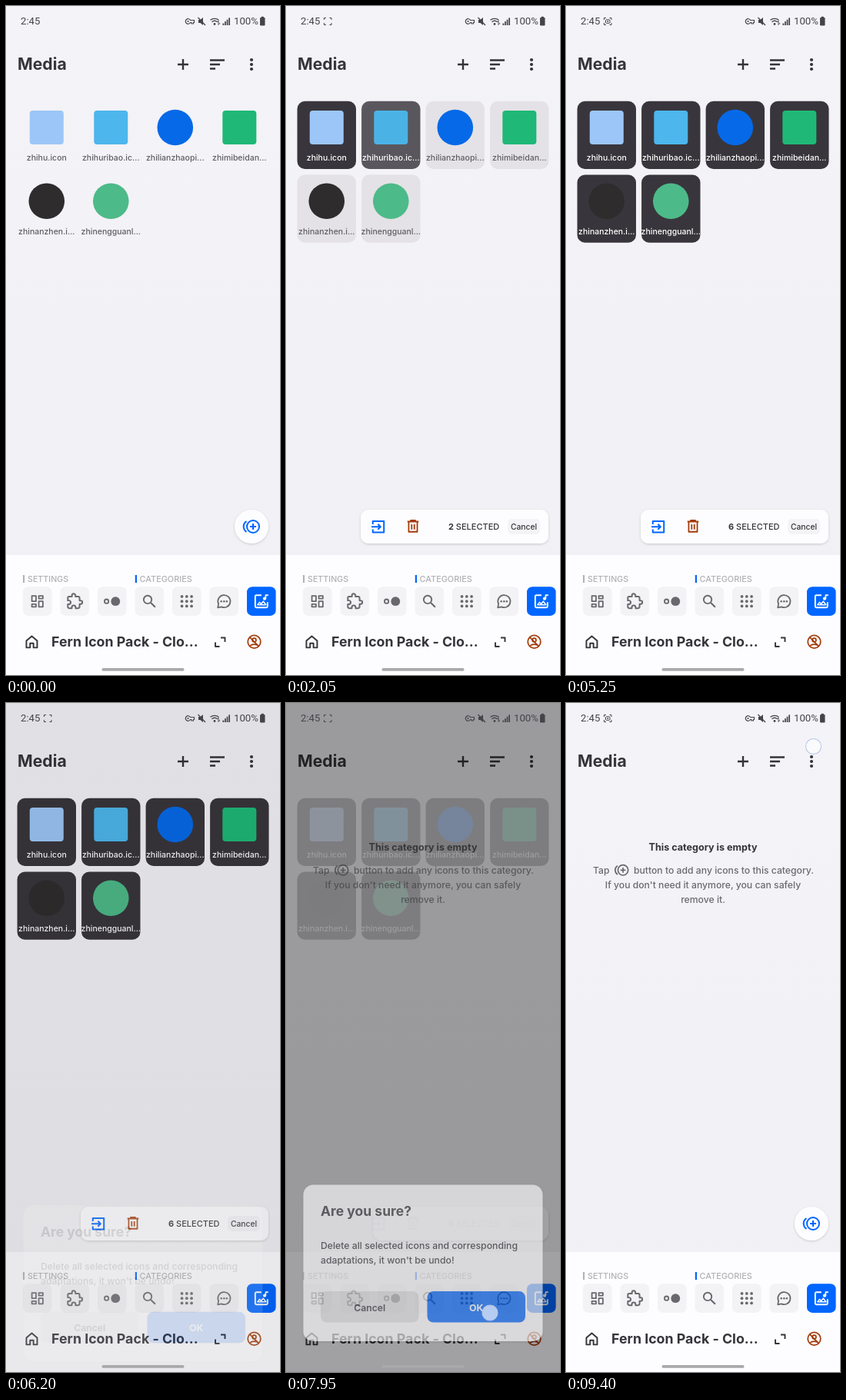
Write an HTML page that moves like this. It is 356 px wide and 870 px high and loops after 9450 ms.

```html
<!DOCTYPE html>
<html lang="en">
<head>
<meta charset="utf-8">
<title>Media category</title>
<style>
html, body { margin: 0; width: 100%; height: 100%; overflow: hidden; background: #f2f1f5; }
svg { display: block; width: 100vw; height: 100vh; }
text { font-family: Inter, "Noto Sans", sans-serif; font-weight: 500; white-space: pre; }
.head { font-weight: 700; fill: #353439; }
.status text { font-family: Roboto, "Noto Sans", sans-serif; font-weight: 400; }
.line { fill: none; stroke: currentColor; stroke-linejoin: round; }
</style>
</head>
<body>
<svg id="stage" viewBox="0 0 356 870"></svg>
<script>
const LOOP = 9450;
const INK = '#353439', GREY = '#69686c', BLUE = '#0066ff', RUST = '#a33a08';
const TILE = { w: 76.4, h: 88.2, r: 10 };

// Each tile: label, shape, colour and the moment it becomes selected.
const tiles = [
  ['zhihu.icon', 'square', '#9cc6f7', 700],
  ['zhihuribao.ic...', 'square', '#4db6ec', 1870],
  ['zhilianzhaopi...', 'circle', '#0669e8', 2570],
  ['zhimibeidan...', 'square', '#1fb877', 3120],
  ['zhinanzhen.i...', 'circle', '#2f2c2e', 3570],
  ['zhinengguanl...', 'circle', '#4dba89', 4070]
].map(([label, shape, color, pick], i) =>
  ({ label, shape, color, pick, x: 14.6 + 83.5 * (i % 4), y: i < 4 ? 123.7 : 219.5 }));

// Each touch: x, y, start, release.
const touches = [
  [63, 186, 250, 1000], [146, 178, 1750, 1870], [229, 178, 2450, 2570], [311, 177, 3000, 3120],
  [62, 274, 3450, 3570], [146, 270, 3950, 4070], [165, 677, 5950, 6070],
  [265, 793, 7700, 7970], [321.5, 56.5, 9400, 9900]
];

const clamp = v => Math.max(0, Math.min(1, v));
const span = (t, from, to) => clamp((t - from) / (to - from));
const easeOut = p => 1 - (1 - p) ** 2;
const easeInOut = p => p < .5 ? 4 * p ** 3 : 1 - (2 - 2 * p) ** 3 / 2;
const lerp = (a, b, p) => a + (b - a) * p;
const mix = (a, b, p) => `rgb(${a.map((v, i) => Math.round(lerp(v, b[i], p)))})`;

const rect = (x, y, w, h, r, fill, more = '') =>
  `<rect x="${x}" y="${y}" width="${w}" height="${h}" rx="${r}" fill="${fill}" ${more}/>`;
const disc = (x, y, r, more = '') => `<circle cx="${x}" cy="${y}" r="${r}" ${more}/>`;
const ring = (x, y, r, w = 2) => disc(x, y, r, `class="line" stroke-width="${w}"`);
const line = (d, w = 2) => `<path class="line" d="${d}" stroke-width="${w}"/>`;
const text = (x, y, size, str, more = '') =>
  `<text x="${x}" y="${y}" font-size="${size}" ${more}>${str}</text>`;
const mid = 'text-anchor="middle"';
// Places a drawing made on a 24 unit grid, centred on x, y.
const icon = (x, y, size, color, body) =>
  `<g color="${color}" fill="${color}" transform="translate(${x - size / 2} ${y - size / 2}) scale(${size / 24})">${body}</g>`;

const art = {
  addMany: ring(14.5, 12, 8) + line('M6 5.2A8 8 0 0 0 6 18.8M14.5 8v8M10.5 12h8'),
  board: line('M4 4h6v8H4zM14 4h6v4h-6zM14 12h6v8h-6zM4 16h6v4H4z'),
  puzzle: line('M20.5 11H19V7c0-1.1-.9-2-2-2h-4V3.5a2.5 2.5 0 0 0-5 0V5H4c-1.1 0-2 .9-2 2v3.8h1.5a2.7 2.7 0 0 1 0 5.4H2V20c0 1.1.9 2 2 2h3.8v-1.5a2.7 2.7 0 0 1 5.4 0V22H17c1.1 0 2-.9 2-2v-4h1.5a2.5 2.5 0 0 0 0-5z', 2.2),
  pair: ring(4, 12, 3) + disc(17, 12, 6.6),
  search: ring(9.5, 9.5, 5.8, 2.1) + line('M14 14l6.5 6.5', 2.3),
  dots: [5, 12, 19].map(y => [5, 12, 19].map(x => disc(x, y, 2.1)).join('')).join(''),
  chat: line('M3 21l1-5.2A9 9 0 1 1 8.2 20z') + [8, 12, 16].map(x => disc(x, 12, 1.4)).join(''),
  image: line('M12 4H5.5A1.5 1.5 0 0 0 4 5.500v13A1.5 1.5 0 0 0 5.5 20h13a1.5 1.5 0 0 0 1.5-1.5V13', 1.9) +
    line('M7 16.500l2.700-3.300 2 2.300 2.800-3.500 3.500 4.500z', 1.5) + disc(16.2, 8.5, 2.1) + line('M17.600 8.500V4H21', 1.7),
  home: line('M4 10.8L12 4l8 6.8V21h-5.5v-6.5h-5V21H4z', 2.2),
  noUser: ring(12, 12, 9.5) + ring(12, 9.5, 2.8, 1.9) +
    line('M6 18c2.5-3 9.5-3 12 0M5.3 5.3l13.4 13.4', 1.9),
  bin: line('M3.5 5h17M8.5 4.5V3h7v1.5M5.500 5v15.500h13V5M10 9v8M14 9v8', 2.1),
  enter: line('M4 8.500V4h16.500v16.500H4V16M2 12.200h13M11.500 8.200l4 4-4 4', 2.3)
};

function statusBar() {
  return `<g class="status" id="status">
    ${text(19, 24, 13.2, '2:45')}
    <g id="finder">${line('M52 15.5h-2.500V18M56.500 15.5H59V18M49.500 22v2.500H52M59 22v2.500h-2.500', 1)}
      <g id="blink">${rect(51.5, 17.8, 5.5, 4.5, 1, 'none', 'class="line" stroke-width="1"')}${disc(54.25, 20, .9)}</g></g>
    ${line('M239.500 18.500a3.300 3.300 0 1 0 0 3h1.500v1.500h2.500v-1.500h1v-3z', 1.200)}${disc(236.5, 20, 1.1)}
    <path d="M250 18h2.5l3.5-3v10l-3.5-3H250z"/>${line('M249.5 15l9.5 10', 1.3)}
    ${line('M265.5 18.3a8.5 8.5 0 0 1 11 0M267.5 20.7a5.5 5.5 0 0 1 7 0', 1.3)}${disc(271, 23.5, 1.4)}
    ${line('M276 19v5.5M278 22l-2 2.5M274.5 21l1.5-2', .9)}
    ${[0, 1, 2, 3].map(i => rect(281.5 + i * 2.6, 22.5 - i * 2.4, 1.7, 2.5 + i * 2.4, 0, 'currentColor')).join('')}
    ${text(296, 24, 13.2, '100%')}
    ${rect(330, 15, 6.5, 10.5, 1.2, 'currentColor')}${rect(331.8, 13.8, 3, 2, .5, 'currentColor')}
  </g>`;
}

function topBar() {
  return text(15, 83, 21.2, 'Media', 'class="head"') +
    `<g color="${INK}" fill="${INK}">${line('M223 76h14M230 69v14', 2.4)}
    ${line('M265 70.5h19M265 76h13M265 81.5h7', 2.5)}
    ${[70, 76, 82].map(y => disc(319, y, 2.1)).join('')}</g>`;
}

function bottomBar() {
  const kinds = ['board', 'puzzle', 'pair', 'search', 'dots', 'chat', 'image'];
  const buttons = kinds.map((kind, i) => {
    const x = 22 + i * 48.5, on = kind === 'image';
    return rect(x, 755.3, 37.6, 37.6, 7, on ? BLUE : '#f3f2f4') +
      icon(x + 18.8, 774.2, on ? 24 : 21.5, on ? '#fff' : GREY, art[kind]);
  }).join('');
  return rect(0, 714, 356, 156, 0, '#fdfcfe') +
    rect(22, 740, 2.2, 10, 0, '#b4b3b7') + text(28, 748.6, 10.7, 'SETTINGS', 'fill="#b1b0b4"') +
    rect(167.8, 740, 2.2, 10, 0, BLUE) + text(173.5, 748.6, 10.9, 'CATEGORIES', 'fill="#b1b0b4"') +
    buttons + icon(33.5, 826.5, 21, INK, art.home) +
    text(59, 833, 17.8, 'Fern Icon Pack - Clo...', 'class="head"') +
    `<g color="${INK}">${line('M279 821.5h5.5v5.5M272 827.5v5.5h5.5', 1.9)}</g>` +
    icon(322.5, 826.8, 21, RUST, art.noUser);
}

function tileMarkup(tile, i) {
  const { x, y } = tile, { w, h, r } = TILE, cx = x + w / 2, cy = y + 34.3;
  const mark = tile.shape === 'circle' ? disc(cx, cy, 23.3, `fill="${tile.color}"`)
    : rect(cx - 22, cy - 22, 44, 44, 4, tile.color);
  return `<clipPath id="clip${i}">${rect(x, y, w, h, r, '#000')}</clipPath>
    ${rect(x, y, w, h, r, '#e5e4e8', `id="tile${i}"`)}${mark}
    <g clip-path="url(#clip${i})">${disc(0, 0, 0, `id="ripple${i}"`)}</g>
    ${text(cx, y + 77.3, 10.5, tile.label, `${mid} id="label${i}"`)}`;
}

function emptyNote() {
  return text(178, 192.3, 12.6, 'This category is empty', `class="head" ${mid}`) +
    `<g fill="#6b6a6e">${text(35, 222, 12.2, 'Tap')}${icon(72, 217.3, 20, GREY, art.addMany)}
    ${text(88, 222, 12.2, 'button to add any icons to this category.')}
    ${text(178, 241, 12.2, "If you don't need it anymore, you can safely", mid)}
    ${text(178, 260, 12.2, 'remove it.', mid)}</g>`;
}

function floatBar() {
  return rect(297, 655, 44, 44, 22, '#fdfdff', 'id="bar" filter="url(#soft)"') +
    `<g id="fab">${icon(318.5, 677, 24, BLUE, art.addMany)}</g>
    <g id="actions">${icon(119.8, 677, 21, BLUE, art.enter)}${icon(165, 676.5, 20.5, RUST, art.bin)}
    <text x="211" y="680.8" font-size="11" fill="${INK}"><tspan id="count" font-weight="700">1</tspan> SELECTED</text>
    ${rect(288, 667, 42, 20, 5, '#f4f3f6')}${text(309, 680.7, 10.3, 'Cancel', `${mid} fill="${INK}"`)}</g>`;
}

function dialog() {
  return `<g id="dialog">${rect(22.5, 630.5, 311, 203.5, 13, '#fefdff', 'filter="url(#soft)"')}
    ${text(45, 671, 17.5, 'Are you sure?', 'class="head"')}
    <g fill="${INK}">${text(45, 714, 12.25, 'Delete all selected icons and corresponding')}
    ${text(45, 733, 12.25, "adaptations, it won't be undo!")}</g>
    ${rect(45, 769, 127.5, 40.5, 8, '#e2e1e5')}${rect(183.5, 769, 127.5, 40.5, 8, BLUE)}
    ${text(108.7, 794.5, 12.2, 'Cancel', `${mid} fill="${INK}" style="font-weight:600"`)}
    ${text(247.3, 794.5, 12.4, 'OK', `${mid} fill="#fff" style="font-weight:700"`)}</g>`;
}

const stage = document.getElementById('stage');
stage.innerHTML = `<defs>
  <linearGradient id="sky" x2="0" y2="1"><stop stop-color="#f4f3f7"/><stop offset="1" stop-color="#f1f0f4"/></linearGradient>
  <filter id="soft" x="-20%" y="-30%" width="140%" height="170%"><feDropShadow dx="0" dy="1" stdDeviation="1.5" flood-opacity=".18"/></filter></defs>
  ${rect(0, 0, 356, 870, 0, 'url(#sky)')}${topBar()}
  <g id="tiles">${tiles.map(tileMarkup).join('')}</g><g id="empty">${emptyNote()}</g>
  ${bottomBar()}${floatBar()}
  ${rect(0, 0, 356, 870, 0, '#000', 'id="dim"')}${dialog()}${statusBar()}
  ${rect(124.5, 861, 107, 3.8, 1.9, '#a9a8ab')}
  ${disc(0, 0, 10, 'id="touch" fill="#fff" fill-opacity=".62" stroke="#b5c7ea" stroke-width="1.1"')}`;

const parts = {};
stage.querySelectorAll('[id]').forEach(el => parts[el.id] = el);
const set = (id, attrs) => { for (const k in attrs) parts[id].setAttribute(k, attrs[k]); };

function drawTiles(t) {
  const mode = span(t, 650, 850);
  tiles.forEach((tile, i) => {
    const p = easeOut(span(t, tile.pick, tile.pick + 330));
    set('tile' + i, { fill: mix([228, 226, 230], [56, 54, 60], p), opacity: mode });
    set('label' + i, { fill: t >= tile.pick ? '#fff' : '#5f5e63' });
    const [x, y, from, to] = touches[i];
    set('ripple' + i, {
      cx: x, cy: y, r: t < from ? 0 : lerp(8, 80, span(t, from, from + 400)),
      opacity: .08 * (1 - span(t, to, to + 250))
    });
  });
  const gone = span(t, 7860, 7980);
  set('tiles', { opacity: 1 - gone });
  set('empty', { opacity: gone });
}

function drawBar(t) {
  const closing = t > 5000;
  const open = closing ? 1 - easeInOut(span(t, 7850, 8220)) : easeInOut(span(t, 743, 1083));
  const x = lerp(297, 97, open);
  set('bar', { x, width: 341 - x, rx: closing ? 22 - 12 * open : 10 + 12 * (1 - open) ** 4 });
  set('fab', {
    transform: `translate(${x - 297} 0)`,
    opacity: closing ? span(t, 8150, 8400) : 1 - span(t, 740, 907)
  });
  set('actions', { opacity: span(t, 1090, 1400) * (1 - span(t, 7850, 7960)) });
  parts.count.textContent = Math.max(1, tiles.filter(tile => t >= tile.pick).length);
}

function drawDialog(t) {
  const inP = span(t, 6150, 6550), outP = span(t, 7850, 8106);
  const shown = inP * (1 - outP);
  set('dim', { opacity: .6 * shown });
  set('dialog', {
    opacity: shown,
    transform: `translate(0 ${lerp(30, 0, easeOut(inP)) - 10 * outP})`
  });
  const tone = t >= 6250 && t < 7900 ? '#fff' : '#454449';
  set('status', { fill: tone, color: tone });
}

function drawTouch(t) {
  const hit = touches.find(([, , from, to]) => t >= from && t < to + 150);
  if (!hit) return set('touch', { opacity: 0 });
  const [x, y, , to] = hit;
  set('touch', { cx: x, cy: y, opacity: 1 - span(t, to, to + 150) });
}

function render(t) {
  drawTiles(t);
  drawBar(t);
  drawDialog(t);
  drawTouch(t);
  set('finder', { opacity: t >= 250 ? 1 : 0 });
  set('blink', { opacity: t % 1000 >= 250 && t % 1000 < 750 ? 1 : 0 });
}

const start = performance.now();
function tick() {
  render((performance.now() - start) % LOOP);
  requestAnimationFrame(tick);
}
tick();
</script>
</body>
</html>
```
